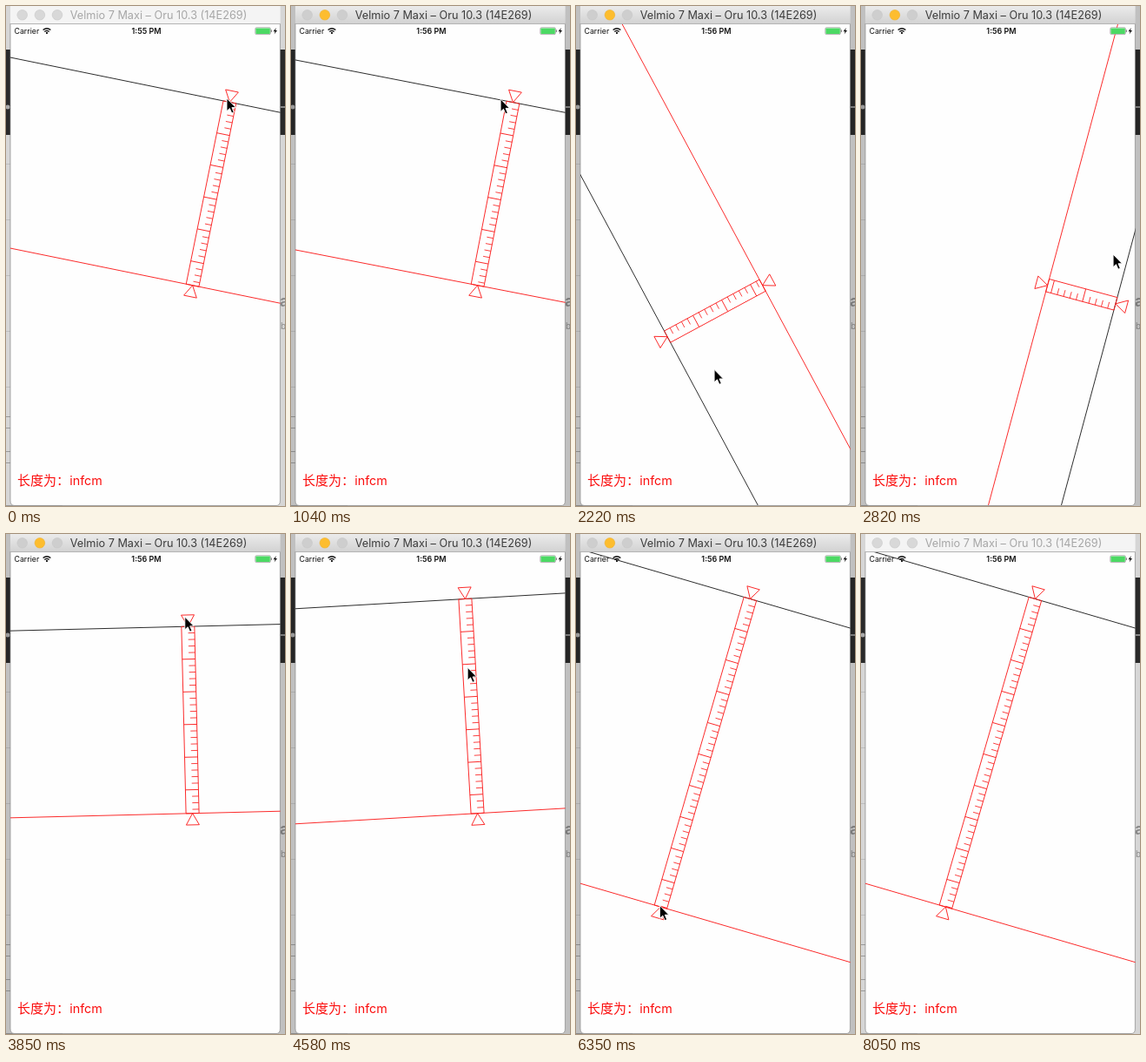
These frames come from a looping animation (321 px wide and 574 px high, 8070 ms). An HTML page:

```html
<!DOCTYPE html>
<html lang="zh">
<head>
<meta charset="utf-8">
<title>Ruler</title>
<style>
html, body { margin: 0; width: 100%; height: 100%; overflow: hidden; background: #d2d2d2; }
svg { display: block; width: 321px; height: 574px; }
text { font-family: Inter, Roboto, sans-serif; }
</style>
</head>
<body>
<svg viewBox="0 0 321 574">
  <defs>
    <linearGradient id="bar" x2="0" y2="1">
      <stop stop-color="#ebebeb"/><stop offset="1" stop-color="#d2d2d2"/>
    </linearGradient>
    <clipPath id="screen"><path d="M5 21H315.6V568Q315.6 573 311 573H10Q5 573 5 568Z"/></clipPath>
  </defs>

  <g id="desk">
    <rect width="321" height="574" fill="#d6d6d6"/>
    <rect y="50" width="321" height="98" fill="#292929"/>
    <circle cx="2" cy="116" r="2.5" fill="#aaa"/>
    <path d="M316 116H321" stroke="#888" stroke-width="2"/>
    <path d="M0 181.5H5M0 245.5H5M0 309.5H5M0 373.5H5M0 437.5H5" stroke="#bdbdbd"/>
    <path d="M0 471.5H5M0 484.5H5M0 511.5H5M0 524.5H5" stroke="#999"/>
    <path d="M0 573.5H65" stroke="#999"/>
    <text x="315" y="345" font-size="17" font-weight="700" fill="#888">a</text>
    <text x="316" y="371" font-size="10" fill="#888">b</text>
  </g>
  <rect id="shade" width="321" height="574" fill="#000"/>

  <path d="M5 20H315.4V568Q315.4 573.5 311 573.5H10Q5 573.5 5 568Z" fill="#fefefe" stroke="#888" stroke-width=".7"/>
  <rect id="title" x="5" width="310.6" height="20.5"/>
  <path d="M5 20.5H315.6" stroke="#b4b4b4"/>
  <g stroke-width=".6">
    <circle class="dot" cx="18.7" cy="10.3" r="5.8"/>
    <circle class="dot" cx="38.9" cy="10.3" r="5.8"/>
    <circle class="dot" cx="59" cy="10.3" r="5.8"/>
  </g>
  <text id="name" x="175.5" y="15" font-size="12.7" text-anchor="middle">Velmio 7 Maxi – Oru 10.3 (14E269)</text>

  <g clip-path="url(#screen)" fill="none" stroke="#fb2020" stroke-width=".95">
    <path id="black" stroke="#222"/>
    <path id="red"/>
    <path id="ruler"/>
    <path id="minor" stroke-width=".85"/>
  </g>

  <text x="9.5" y="32" font-size="8.8" fill="#111">Carrier</text>
  <g fill="none" stroke="#111" stroke-width="1.3">
    <path d="M42.6 27.6Q47 23.8 51.4 27.6M44.3 29.4Q47 27.2 49.7 29.4"/>
    <circle cx="47" cy="31" r=".5"/>
  </g>
  <text id="clock" x="161.5" y="32" font-size="9" font-weight="600" text-anchor="middle" fill="#111"></text>
  <rect x="286.8" y="24.8" width="17.6" height="7.8" rx="1.4" fill="#fff" stroke="#666" stroke-width=".5"/>
  <rect x="287.4" y="25.4" width="16.4" height="6.6" rx=".8" fill="#4cd964"/>
  <path d="M305.3 27.3V30" stroke="#777"/>
  <path d="M310.8 25L307.5 29.3H309.6L308.6 32.4L312 28H310Z" fill="#111"/>

  <g fill="#fb0d0d">
    <text x="13" y="550" font-size="15" style="font-family:'Noto Sans CJK SC','Noto Sans CJK',sans-serif">长度为：</text>
    <text x="73.3" y="550" font-size="14.3">infcm</text>
  </g>

  <path id="cursor" d="M0 0V14.6L3.4 11.5L5.8 17L8.2 16L5.9 10.6H10.4Z" fill="#000" stroke="#fff" stroke-width=".9"/>
</svg>
<script>
const $ = id => document.getElementById(id);
const LOOP = 8070, START = 890, STEP = 147, LAST = 37;
const PIVOT = [214.6, 320.7];

// Upper handle around the pivot: step, angle in degrees, radius
const SWING = [
  [0, -78.5, 214.6], [1, -79, 214], [2, -82, 212], [4, -92, 203],
  [5, -99.1, 188.1], [6, -112.3, 159.4], [7, -140, 146], [13, -344.9, 81.1],
  [14, -381.9, 84.6], [15, -407, 100], [16, -418, 130], [18, -436, 192],
  [20, -451.4, 214.6], [21, -451.5, 221.6], [22, -452.6, 240], [23, -453.3, 246.6]
];
// Lower handle: step, x, y
const PULL = [
  [30, ...PIVOT], [31, 208, 334], [32, 178, 371.5], [33, 150, 392],
  [34, 125, 410], [35, 108, 421.5], [36, 100, 427], [37, 97.4, 428.1]
];

function along(keys, n) {
  if (n <= keys[0][0]) return keys[0].slice(1);
  for (let i = 1; i < keys.length; i++) {
    const a = keys[i - 1], b = keys[i];
    if (n <= b[0]) {
      const k = (n - a[0]) / (b[0] - a[0]);
      return [a[1] + (b[1] - a[1]) * k, a[2] + (b[2] - a[2]) * k];
    }
  }
  return keys[keys.length - 1].slice(1);
}

function upper(n) {
  const [deg, r] = along(SWING, n), a = deg * Math.PI / 180;
  return [PIVOT[0] + r * Math.cos(a), PIVOT[1] + r * Math.sin(a)];
}
const lower = n => along(PULL, n);
const shift = (p, dx, dy) => [p[0] + dx, p[1] + dy];

// The pointer runs one step ahead of the handle it drags
function pointer(t, n) {
  if (t < START) return t < 150 ? [254, 106] : [255, 107];
  if (t >= 6800) return t < 7100 ? [245, 568] : null;
  if (n <= 23) return shift(upper(n + 1), -3, -4);
  if (n >= 29) return shift(lower(n + 1), -1, -1.5);
  return along([[23, 198, 70.5], [29, 213.5, 319]], n);
}

function drawRuler(a, b) {
  const len = Math.hypot(b[0] - a[0], b[1] - a[1]);
  const ux = (b[0] - a[0]) / len, uy = (b[1] - a[1]) / len;
  // d runs down the ruler, s across it
  const at = (d, s) => (a[0] + ux * d + uy * s).toFixed(2) + ' ' + (a[1] + uy * d - ux * s).toFixed(2);
  const line = (d, s1, s2) => `M${at(d, s1)}L${at(d, s2)}`;
  const poly = pts => 'M' + pts.map(p => at(...p)).join('L') + 'Z';
  const W = 7.5;

  $('black').setAttribute('d', line(0, -900, 900));
  $('red').setAttribute('d', line(len, -900, 900));
  let major = poly([[0, -W], [0, W], [len, W], [len, -W]])
    + poly([[0, 0], [-13.2, -W], [-13.2, W]])
    + poly([[len, 0], [len + 13.2, -W], [len + 13.2, W]]);
  let minor = '';
  for (let i = 1; i * 7.5 < len; i++) {
    if (i % 5) minor += line(i * 7.5, 0, W);
    else major += line(i * 7.5, -W, W);
  }
  $('ruler').setAttribute('d', major);
  $('minor').setAttribute('d', minor);
}

function drawWindow(active) {
  $('title').setAttribute('fill', active ? 'url(#bar)' : '#f4f4f4');
  $('name').setAttribute('fill', active ? '#3c3c3c' : '#a6a6a6');
  $('shade').setAttribute('opacity', active ? .1 : 0);
  document.querySelectorAll('.dot').forEach((dot, i) => {
    const lit = active && i === 1;
    dot.setAttribute('fill', lit ? '#fdbd2e' : active ? '#cecece' : '#d8d8d8');
    dot.setAttribute('stroke', lit ? '#efb02c' : '#c6c6c6');
  });
}

function render(t) {
  const n = Math.max(0, Math.min(LAST, Math.floor((t - START) / STEP)));
  drawWindow(t >= START && t < 8050);
  drawRuler(upper(n), lower(n));
  $('clock').textContent = t < 290 ? '1:55 PM' : '1:56 PM';
  const p = pointer(t, n);
  $('cursor').style.display = p ? '' : 'none';
  if (p) $('cursor').setAttribute('transform', `translate(${p[0]} ${p[1]})`);
}

const begin = performance.now();
function tick() {
  render((performance.now() - begin) % LOOP);
  requestAnimationFrame(tick);
}
tick();
</script>
</body>
</html>
```
